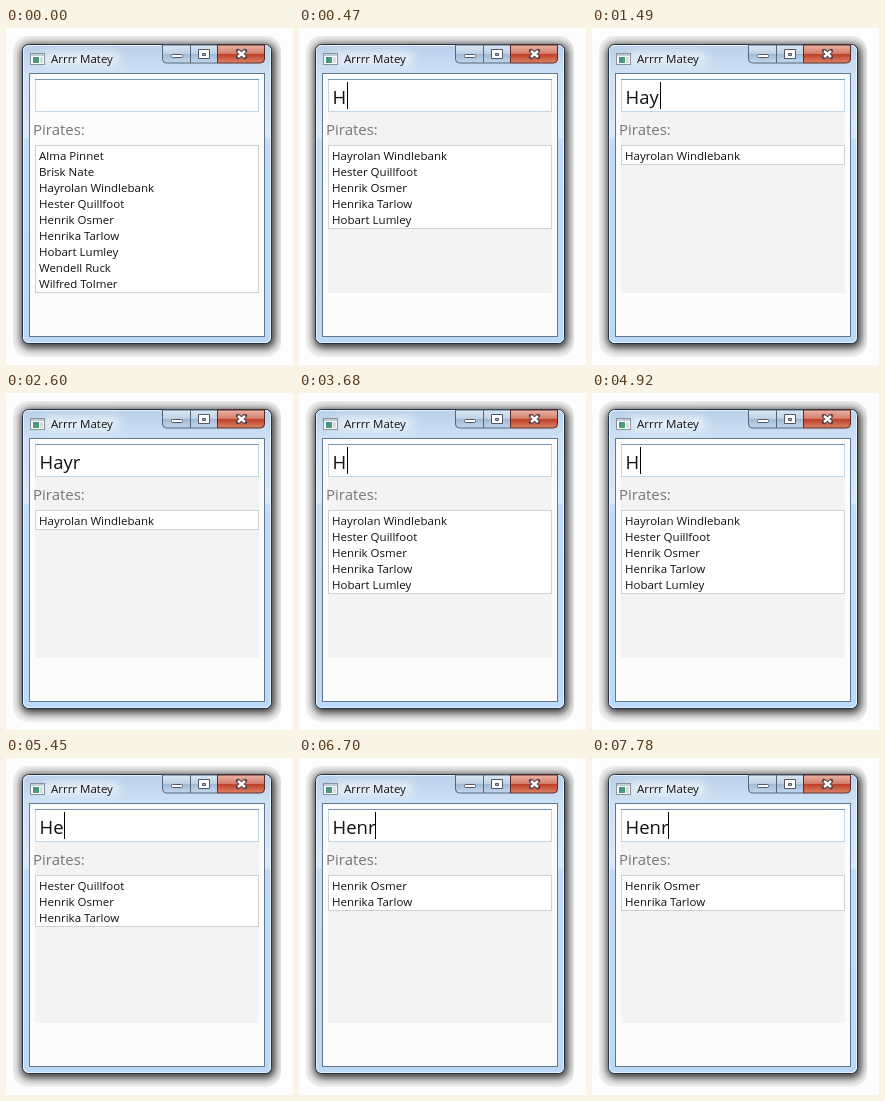
Animation of 287 by 337 pixels, one loop 8 s. Source, as an HTML page:

```html
<!DOCTYPE html>
<html lang="en">
<head>
<meta charset="utf-8">
<title>Arrrr Matey</title>
<style>
  html, body { margin: 0; width: 100%; height: 100%; overflow: hidden; background: #fdfdfd; }
  svg { display: block; width: 287px; height: 337px; }
  text { font: 11.5px "Open Sans", "Noto Sans", sans-serif; fill: #111; white-space: pre; }
  #label { font-size: 15px; fill: #777; }
  #typed { font-size: 18.5px; }
</style>
</head>
<body>
<svg viewBox="0 0 287 337">
  <defs>
    <linearGradient id="glass" x2="0" y2="1">
      <stop stop-color="#b9d0e9"/>
      <stop offset=".1" stop-color="#cfe2f6"/>
      <stop offset=".31" stop-color="#d6eafc"/>
      <stop offset=".32" stop-color="#c2dcf8"/>
      <stop offset="1" stop-color="#bcd9f7"/>
    </linearGradient>
    <linearGradient id="button" x2="0" y2="1">
      <stop stop-color="#dce8f4"/>
      <stop offset=".47" stop-color="#c0d2e6"/>
      <stop offset=".5" stop-color="#a0b8d2"/>
      <stop offset="1" stop-color="#c2d8ee"/>
    </linearGradient>
    <linearGradient id="close" x2="0" y2="1">
      <stop stop-color="#eab4a6"/>
      <stop offset=".47" stop-color="#d5806d"/>
      <stop offset=".5" stop-color="#bd3d25"/>
      <stop offset="1" stop-color="#dc8468"/>
    </linearGradient>
    <linearGradient id="pane" x2="1" y2="1">
      <stop stop-color="#3d8a9a"/>
      <stop offset="1" stop-color="#55a566"/>
    </linearGradient>
    <filter id="blur" x="-20%" y="-20%" width="140%" height="140%"><feGaussianBlur stdDeviation="4.5"/></filter>
    <filter id="glow" x="-30%" y="-100%" width="160%" height="300%"><feGaussianBlur stdDeviation="5"/></filter>
    <clipPath id="halo"><rect x="7" y="8" width="268" height="321" rx="15"/></clipPath>
  </defs>

  <!-- window frame -->
  <g clip-path="url(#halo)">
    <rect width="287" height="337" fill="#f0f0f0"/>
    <rect x="15" y="16" width="254" height="304" rx="8" opacity=".8" filter="url(#blur)"/>
  </g>
  <rect x="16.5" y="16.5" width="249" height="299" rx="6" fill="url(#glass)" stroke="#26323f"/>
  <rect x="17.5" y="17.5" width="247" height="297" rx="5" fill="none" stroke="#eaf6ff" stroke-opacity=".85"/>
  <rect x="36" y="24" width="78" height="13" rx="6" fill="#fff" opacity=".6" filter="url(#glow)"/>
  <rect x="23.5" y="45.5" width="235" height="263" fill="#fcfcfc" stroke="#62788f"/>

  <!-- title bar -->
  <rect x="24.5" y="25.5" width="14" height="11" fill="#fafafa" stroke="#8a9299"/>
  <rect x="25" y="26" width="13" height="2" fill="#c3ccd4"/>
  <rect x="27" y="29" width="6" height="6" fill="url(#pane)"/>
  <path d="M34 29h3v6h-3z" fill="#d6dce0"/>
  <text x="45" y="35">Arrrr Matey</text>
  <path d="M156.5 17v14q0 4 4 4H184.5V17z" fill="url(#button)" stroke="#53667b"/>
  <path d="M184.5 17v18H211.5V17z" fill="url(#button)" stroke="#53667b"/>
  <path d="M211.5 17v18H254.5q4 0 4-4V17z" fill="url(#close)" stroke="#5a2a28"/>
  <rect x="165.5" y="26.5" width="11" height="3" rx="1" fill="#fff" stroke="#535666"/>
  <path d="M192.5 21.5h11v9h-11zM196.5 25.5v2h3v-2z" fill="#fff" fill-rule="evenodd" stroke="#535666"/>
  <path d="M232 23l7 6M239 23l-7 6" stroke="#53404a" stroke-width="4.4" stroke-linecap="round"/>
  <path d="M232 23l7 6M239 23l-7 6" stroke="#fff" stroke-width="2.4"/>

  <!-- content -->
  <rect id="shade" x="29" y="84" width="224" height="181" fill="#f3f3f3"/>
  <rect x="29.5" y="51.5" width="223" height="32" fill="#fff" stroke="#c3d6e6"/>
  <path d="M29 51.5h224" stroke="#7196b8"/>
  <text id="typed" x="33.5" y="76"></text>
  <rect id="caret" y="54" width="1" height="27"/>
  <text id="label" x="27" y="107">Pirates:</text>
  <rect id="box" x="29.5" y="117.5" width="223" fill="#fff" stroke="#d0d0d0"/>
  <g id="rows"></g>
</svg>
<script>
const LOOP = 8000;
const pirates = ["Alma Pinnet", "Brisk Nate", "Hayrolan Windlebank", "Hester Quillfoot",
  "Henrik Osmer", "Henrika Tarlow", "Hobart Lumley", "Wendell Ruck", "Wilfred Tolmer"];

// [start ms, typed text, caret x (0 = hidden)]
const steps = [
  [0, "", 0], [310, "", 34], [470, "H", 48], [930, "Ha", 58], [1490, "Hay", 68],
  [2040, "Hayr", 75], [2600, "Hayr", 0], [2970, "Hay", 68], [3250, "Ha", 58],
  [3530, "H", 58], [3680, "H", 48], [3960, "", 34], [4360, "", 0], [4920, "H", 48],
  [5450, "He", 58], [6010, "Hen", 69], [6700, "Henr", 76], [7250, "Henr", 0], [7780, "Henr", 76]
];

const $ = id => document.getElementById(id);
let shown;

function show(step) {
  const [start, text, x] = step;
  const matches = pirates.filter(name => name.startsWith(text));
  $("typed").textContent = text;
  $("caret").setAttribute("x", x);
  $("caret").setAttribute("visibility", x ? "visible" : "hidden");
  $("shade").setAttribute("visibility", start >= 470 ? "visible" : "hidden");
  $("box").setAttribute("height", matches.length * 16 + 3);
  $("rows").innerHTML = matches
    .map((name, i) => `<text x="33" y="${132 + i * 16}">${name}</text>`).join("");
}

function tick() {
  const t = performance.now() % LOOP;
  const step = steps.findLast(s => s[0] <= t);
  if (step !== shown) show(shown = step);
  requestAnimationFrame(tick);
}
tick();
</script>
</body>
</html>
```
